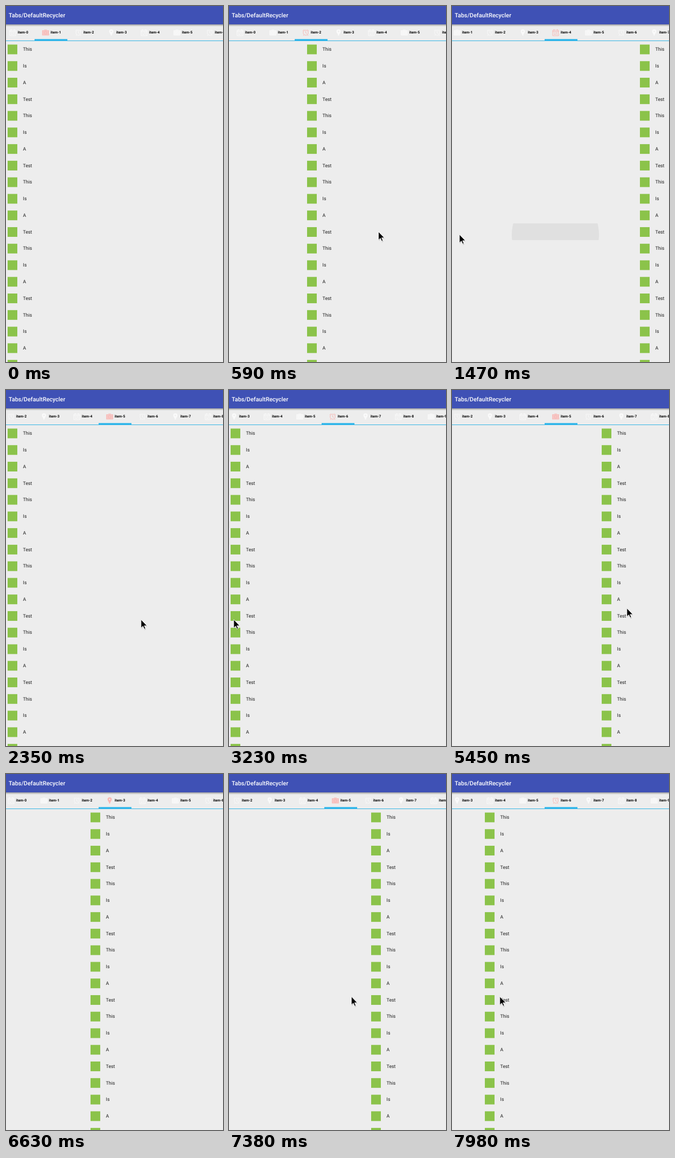
An HTML page that plays this animation: 403x660 px, repeating every 8 s.

```html
<!DOCTYPE html>
<html lang="en">
<head>
<meta charset="utf-8">
<title>Tabs</title>
<style>
  html, body { margin: 0; width: 100%; height: 100%; overflow: hidden; background: #ededed; }
  svg { display: block; font-family: Roboto, sans-serif; text-rendering: geometricPrecision; }
  .title { font-size: 10.95px; font-weight: 500; fill: #fff; }
  .row { font-size: 8.8px; fill: #1c1c1c; }
  .label { font-size: 6.6px; font-weight: 700; fill: #000; }
  .tab { color: #fafafa; }
  .tab.on { color: #f9b7b3; }
  .line { fill: none; stroke: currentColor; }
</style>
</head>
<body>
<svg id="stage" width="403" height="660" viewBox="0 0 403 660">
  <defs>
    <linearGradient id="shade" x2="0" y2="1">
      <stop stop-color="#000" stop-opacity=".34"/>
      <stop offset="1" stop-color="#000" stop-opacity="0"/>
    </linearGradient>
    <clipPath id="pressedRow"><rect y="403" width="403" height="31"/></clipPath>
    <g id="icon0" class="line">
      <path d="M1 2.5H12V12.5H1ZM1 5H12M3.5 .5V3.5M9.5 .5V3.5"/>
      <path stroke-width="1.2" d="M3 7.5H5M6 7.5H10M3 10H7M8 10H10"/>
    </g>
    <g id="icon1">
      <path fill="currentColor" fill-opacity=".7" stroke="currentColor" stroke-width=".8"
        d="M.5 3H3.5L4.5 1.8H8.5L9.5 3H12.5V11.6H.5Z"/>
      <circle class="line" cx="6.5" cy="7.2" r="2.6"/>
    </g>
    <g id="icon2" class="line">
      <circle cx="6.5" cy="7" r="4.7"/>
      <path d="M6.5 4V7.3L8.8 8.6M.7 4L3.7 1.3M9.3 1.3L12.3 4M3.5 10.5L2 12.5M9.5 10.5L11 12.5"/>
    </g>
    <path id="icon3" fill="currentColor" fill-rule="evenodd"
      d="M6.5 .8A3.9 3.9 0 0 1 10.4 4.7C10.4 7 7.5 9 7.2 12.5H5.8C5.5 9 2.6 7 2.6 4.7A3.9 3.9 0 0 1 6.5 .8ZM6.5 3.3A1.3 1.3 0 0 0 6.5 5.9A1.3 1.3 0 0 0 6.5 3.3Z"/>
    <g id="page"></g>
  </defs>
  <rect width="403" height="660" fill="#ededed"/>
  <g id="ripple" clip-path="url(#pressedRow)"><circle cx="192" cy="424" r="81" fill="#e0e0e0"/></g>
  <use id="left" href="#page"/>
  <use id="right" href="#page"/>
  <rect y="34" width="403" height="31" fill="#ededed"/>
  <rect y="64" width="403" height="1" fill="#33b5e5"/>
  <g id="tabs"><rect id="bar" y="61.3" width="61" height="3" fill="#2fb5ea"/></g>
  <rect y="34" width="403" height="4" fill="url(#shade)"/>
  <rect width="403" height="34" fill="#3f51b5"/>
  <text class="title" x="5" y="21">Tabs/DefaultRecycler</text>
  <g id="cursor">
    <path d="M1.5 2.5V17.5L5 14.5L7.5 20L10 19L7.5 13.5H12.5Z" fill="#000" opacity=".18"/>
    <path d="M.8 .6V16L4.4 12.8L6.9 18.3L9.2 17.3L6.8 12H11.8Z" fill="#000" stroke="#fff" stroke-width=".9"/>
  </g>
</svg>
<script>
const LOOP = 8000, STEP = 147.3, LEAD = 12, LAST = 54;
const WIDTH = 403, TAB = 61, ROW = 30.77;
const FIRST_PAGE = 1, FIRST_SCROLL = 8;
const SWIPE = 2.5, GLIDE = 1.7, PRESS = 0.8; // durations in steps

const $ = id => document.getElementById(id);
const clamp = u => Math.min(1, Math.max(0, u));
const ease = u => (u = clamp(u), u * u * (3 - 2 * u));
const move = (node, x, y = 0) => node.setAttribute("transform", `translate(${x} ${y})`);

// Start step of each swipe, grouped into runs of one direction
const runs = [
  { by: 1, at: [0, 2.5, 5, 9.41, 17] },
  { by: -1, at: [28.57, 35.44, 38.2] },
  { by: 1, at: [43.55, 46.1, 49, 52.1] }
];
const pressAt = 9.41;

const path = [
  { at: 0, x: 420, y: 415 }, { at: 10, x: 13, y: 423 }, { at: 16, x: 250, y: 425 },
  { at: 22, x: 8, y: 425 }, { at: 32, x: 99, y: 402 }, { at: 37, x: 324, y: 404 },
  { at: 41, x: 420, y: 410 }, { at: 45, x: 420, y: 412 }, { at: 54, x: 88, y: 412 }
];

function pointer(step) {
  const i = Math.max(1, path.findIndex(p => p.at >= step));
  const a = path[i - 1], b = path[i];
  const u = ease((step - a.at) / (b.at - a.at));
  return [a.x + (b.x - a.x) * u, a.y + (b.y - a.y) * u];
}

const tabScroll = page => Math.max(0, page * TAB - 172);

// The strip glides to a tab once the swipe to its page has settled.
function pager(step) {
  let page = FIRST_PAGE, position = page, selected = page;
  let scroll = FIRST_SCROLL * (1 - ease(step / GLIDE));
  for (const { by, at } of runs) {
    for (const start of at) {
      const end = start + SWIPE, next = page + by;
      position += by * ease((step - start) / SWIPE);
      scroll += (tabScroll(next) - tabScroll(page)) * ease((step - end) / GLIDE);
      if (step >= end) selected = next;
      page = next;
    }
  }
  return { position, selected, scroll: Math.round(scroll) };
}

function add(parent, name, attrs, text = "") {
  const node = document.createElementNS("http://www.w3.org/2000/svg", name);
  for (const key in attrs) node.setAttribute(key, attrs[key]);
  node.textContent = text;
  return parent.appendChild(node);
}

for (let i = 0; i < 20; i++) {
  const y = 80 + i * ROW;
  add($("page"), "rect", { x: 3, y: y - 8.5, width: 18, height: 18, fill: "#8bc34a" });
  add($("page"), "text", { class: "row", x: 31.6, y: y + 3.2 }, ["This", "Is", "A", "Test"][i % 4]);
}

const tabs = Array.from({ length: 14 }, (_, i) => {
  const tab = add($("tabs"), "g", { class: "tab" });
  move(tab, i * TAB);
  add(tab, "use", { href: "#icon" + i % 4, x: 14, y: 42.5 });
  add(tab, "text", { class: "label", x: 29.7, y: 51.4 }, "item-" + i);
  return tab;
});

function draw(step) {
  const { position, selected, scroll } = pager(step);
  const x = Math.round((Math.ceil(position) - position) * WIDTH);
  move($("right"), x);
  move($("left"), x - WIDTH);
  move($("tabs"), -scroll);
  $("bar").setAttribute("x", selected * TAB);
  tabs.forEach((tab, i) => tab.classList.toggle("on", i === selected));
  move($("cursor"), ...pointer(step));
  const pressed = step >= pressAt && step < pressAt + PRESS;
  $("ripple").style.display = pressed ? "" : "none";
}

const start = performance.now();
function tick() {
  const time = (performance.now() - start) % LOOP;
  draw(Math.min(LAST, Math.floor((time + LEAD) / STEP)));
  requestAnimationFrame(tick);
}
tick();
</script>
</body>
</html>
```
